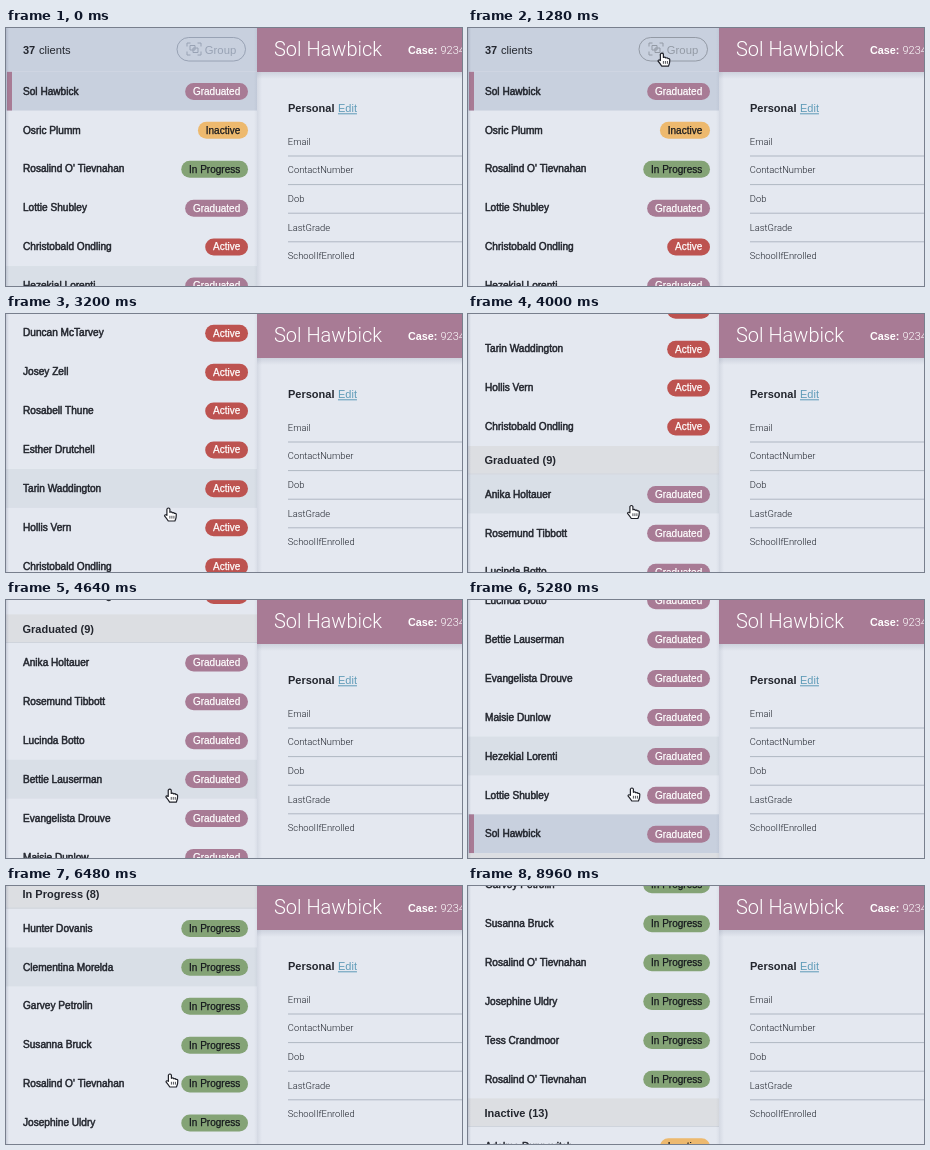
An HTML page with a canvas for the animation above (9840 ms loop, 456 by 258 pixels).

```html
<!DOCTYPE html>
<html lang="en">
<head>
<meta charset="utf-8">
<title>Client list</title>
<style>
  html, body { margin: 0; width: 100%; height: 100%; overflow: hidden; background: #e4e8f0; }
  canvas { display: block; width: 456px; height: 258px; }
</style>
</head>
<body>
<canvas id="stage"></canvas>
<script>
const W = 456, H = 258, LOOP = 9840;
const TOP = 43.6, ROW = 38.9, HEAD = 28.6, LIST = 251;
const GROUPED_AT = 1760, GONE_AT = 8400;
const SANS = '"Liberation Sans", Arial, sans-serif';
const LIGHT = 'Roboto, "Liberation Sans", sans-serif';
const INK = '#23262e', MAUVE = '#a87b95', PALE = '#e4e8f0', PICKED = '#c8d0de', LINK = '#5f9bb8';

const STATUS = {
  Active: { fill: '#bd5350', ink: '#fff' },
  Graduated: { fill: MAUVE, ink: '#fff' },
  'In Progress': { fill: '#84a376', ink: '#14171c' },
  Inactive: { fill: '#edb96e', ink: '#14171c' }
};
const SELECTED = 'Sol Hawbick';

const groups = [
  ['Active', 7, ['Duncan McTarvey', 'Josey Zell', 'Rosabell Thune', 'Esther Drutchell',
    'Tarin Waddington', 'Hollis Vern', 'Christobald Ondling']],
  ['Graduated', 9, ['Anika Holtauer', 'Rosemund Tibbott', 'Lucinda Botto', 'Bettie Lauserman',
    'Evangelista Drouve', 'Maisie Dunlow', 'Hezekial Lorenti', 'Lottie Shubley', SELECTED]],
  ['In Progress', 8, ['Hunter Dovanis', 'Clementina Morelda', 'Garvey Petrolin', 'Susanna Bruck',
    "Rosalind O' Tievnahan", 'Josephine Uldry', 'Tess Crandmoor', "Rosalind O' Tievnahan"]],
  ['Inactive', 13, ['Adelmo Dunnevitch']]
];
const mixed = [
  [SELECTED, 'Graduated'], ['Osric Plumm', 'Inactive'], ["Rosalind O' Tievnahan", 'In Progress'],
  ['Lottie Shubley', 'Graduated'], ['Christobald Ondling', 'Active'], ['Hezekial Lorenti', 'Graduated']
];

// Items carry their top edge in list coordinates.
const flatList = mixed.map(([name, status], i) => ({ name, status, y: TOP + i * ROW, h: ROW }));
const groupedList = [];
let nextY = TOP;
for (const [status, count, names] of groups) {
  groupedList.push({ title: `${status} (${count})`, y: nextY, h: HEAD });
  nextY += HEAD;
  for (const name of names) {
    groupedList.push({ name, status, y: nextY, h: ROW });
    nextY += ROW;
  }
}

// [time, scroll offset]
const scrollKeys = [[2960, 0], [3200, 72.5], [3520, 184], [3600, 184], [4000, 212.4], [4400, 300],
  [4480, 300], [5040, 450], [5200, 450], [5280, 469.7], [5920, 625], [6160, 625], [6480, 728.8], [6720, 850.6]];
// [time, x, y] of the fingertip
const pointerKeys = [[0, 178, 264], [240, 180, 250], [360, 180, 250], [1200, 194, 25], [2400, 194, 25],
  [2880, 162.5, 193.8], [3200, 162.5, 193.8], [4000, 163.5, 191.3], [5040, 164, 187.8], [7680, 164, 187.8],
  [8000, 168, 226], [8080, 168, 226], [8400, 176, 264]];
// While scrolling, the hovered row only refreshes at these times.
const hoverTimes = [2960, 3120, 3560, 4440, 5120, 6000, 6720];

function segment(keys, t) {
  let i = 0;
  while (i < keys.length - 2 && t >= keys[i + 1][0]) i++;
  return i;
}

function slope(keys, i) {
  const rate = j => (keys[j + 1][1] - keys[j][1]) / (keys[j + 1][0] - keys[j][0]);
  if (i === 0 || i === keys.length - 1) return 0;
  const a = rate(i - 1), b = rate(i);
  return a * b > 0 ? 2 * a * b / (a + b) : 0;
}

const unit = (t, a, b) => Math.min(1, Math.max(0, (t - a) / (b - a)));

function scrollAt(t) {
  const i = segment(scrollKeys, t);
  const [t0, a] = scrollKeys[i], [t1, b] = scrollKeys[i + 1];
  const u = unit(t, t0, t1), d = t1 - t0;
  return a + (b - a) * u * u * (3 - 2 * u)
    + d * slope(scrollKeys, i) * u * (1 - u) * (1 - u)
    - d * slope(scrollKeys, i + 1) * u * u * (1 - u);
}

function pointerAt(t) {
  const i = segment(pointerKeys, t);
  const [t0, x0, y0] = pointerKeys[i], [t1, x1, y1] = pointerKeys[i + 1];
  const u = unit(t, t0, t1), e = u * u * (3 - 2 * u);
  return { x: x0 + (x1 - x0) * e, y: y0 + (y1 - y0) * e };
}

function hoverAt(t) {
  if (t >= GONE_AT) return -1;
  let when = t;
  if (t >= hoverTimes[0] && t < 7680) when = hoverTimes.filter(h => h <= t).pop();
  return scrollAt(when) + pointerAt(when).y;
}

const canvas = document.getElementById('stage');
const ratio = window.devicePixelRatio || 1;
canvas.width = Math.round(W * ratio);
canvas.height = Math.round(H * ratio);
const ctx = canvas.getContext('2d');
ctx.scale(ratio, ratio);
ctx.lineJoin = 'round';

function box(x, y, w, h, fill) {
  ctx.fillStyle = fill;
  ctx.fillRect(x, y, w, h);
}

// A thin outline of the given weight stands in for a medium face.
function text(str, x, y, font, fill = INK, weight = 0) {
  ctx.font = font;
  ctx.fillStyle = ctx.strokeStyle = fill;
  ctx.fillText(str, x, y);
  if (weight) {
    ctx.lineWidth = weight;
    ctx.strokeText(str, x, y);
  }
  return ctx.measureText(str).width;
}

function roundPath(x, y, w, h, r) {
  ctx.beginPath();
  ctx.moveTo(x + r, y);
  ctx.arcTo(x + w, y, x + w, y + h, r);
  ctx.arcTo(x + w, y + h, x, y + h, r);
  ctx.arcTo(x, y + h, x, y, r);
  ctx.arcTo(x, y, x + w, y, r);
  ctx.closePath();
}

function shade(x0, y0, x1, y1, from, to) {
  const g = ctx.createLinearGradient(x0, y0, x1, y1);
  g.addColorStop(0, `rgba(70,80,110,${from})`);
  g.addColorStop(1, `rgba(70,80,110,${to})`);
  return g;
}

function drawPill(status, mid) {
  const { fill, ink } = STATUS[status], font = `10px ${SANS}`;
  ctx.font = font;
  const w = ctx.measureText(status).width + 15.6;
  roundPath(242 - w, mid - 8.5, w, 17, 8.5);
  ctx.fillStyle = fill;
  ctx.fill();
  text(status, 249.8 - w, mid + 3.4, font, ink, 0.25);
}

function drawItem(item, y, hovered) {
  const mid = y + item.h / 2;
  if (item.title) {
    box(0, y, LIST, item.h, '#dcdee2');
    box(0, y + item.h - 1, LIST, 1, '#cfd4dc');
    text(item.title, 16.5, mid + 4, `bold 11px ${SANS}`);
    return;
  }
  const selected = item.name === SELECTED;
  if (selected || hovered) box(0, y, LIST, item.h, selected ? PICKED : '#d9dfe7');
  if (selected) box(1, y, 5, item.h, MAUVE);
  text(item.name, 17, mid + 3.6, `10.1px ${SANS}`, INK, 0.5);
  drawPill(item.status, mid + 0.4);
}

function drawGroupIcon(x, y) {
  for (const [cx, cy, sx, sy] of [[0, 0, 1, 1], [14, 0, -1, 1], [0, 12, 1, -1], [14, 12, -1, -1]]) {
    ctx.beginPath();
    ctx.moveTo(x + cx, y + cy + 3.5 * sy);
    ctx.lineTo(x + cx, y + cy);
    ctx.lineTo(x + cx + 3.5 * sx, y + cy);
    ctx.stroke();
  }
  ctx.strokeRect(x + 3, y + 2.5, 5, 4.5);
  ctx.strokeRect(x + 6, y + 5, 5, 4.5);
}

function drawToolbar(y, active) {
  const tone = active ? '#939aa5' : '#98a2b4';
  box(0, y, LIST, TOP, PICKED);
  text('37', 17, y + 25.5, `bold 11px ${SANS}`);
  text('clients', 33, y + 25.5, `11.2px ${SANS}`);
  ctx.strokeStyle = tone;
  ctx.lineWidth = 1;
  roundPath(171, y + 9.5, 68.5, 23.5, 11.75);
  ctx.stroke();
  drawGroupIcon(181, y + 15);
  text('Group', 198.8, y + 25.5, `11.3px ${SANS}`, tone);
}

function drawDetails() {
  box(LIST, 0, W - LIST, H, PALE);
  box(LIST, 44, 5, H - 44, shade(LIST, 0, LIST + 5, 0, 0.1, 0));
  box(LIST, 44, W - LIST, 7, shade(0, 44, 0, 51, 0.14, 0));
  box(LIST, 0, W - LIST, 44, MAUVE);
  text(SELECTED, 268, 27.5, `300 20px ${LIGHT}`, '#fff');
  text('Case:', 402, 25.5, `bold 10.8px ${SANS}`, '#fff');
  text('92345', 434.5, 25.5, `300 11px ${LIGHT}`, '#fff');

  text('Personal', 282, 84, `bold 11px ${SANS}`);
  const w = text('Edit', 332, 84, `11px ${SANS}`, LINK);
  box(332, 85.3, w, 1, LINK);
  ['Email', 'ContactNumber', 'Dob', 'LastGrade', 'SchoolIfEnrolled'].forEach((label, i) => {
    const y = 116.8 + i * 28.6;
    text(label, 281.8, y, `300 9.4px ${LIGHT}`, '#1c2029');
    if (i < 4) box(282, y + 10.7, W - 282, 1, '#b0b7c3');
  });
}

const hand = new Path2D('M-1.6 7.5V1.2Q0-.8 1.4 1.2V4.5Q3 3.6 3.8 5Q5.4 4.3 6 5.6Q7.6 5.2 7.8 6.8' +
  'L7.6 9.5Q7.4 11 6.4 13.2H-.2Q-1.5 11-4 8Q-3.6 6.2-1.6 7.5Z');
const knuckles = new Path2D('M1.4 8V10.8M3.4 8V10.8M5.4 8V10.8');

function drawPointer({ x, y }) {
  ctx.save();
  ctx.translate(x, y);
  ctx.fillStyle = '#fff';
  ctx.strokeStyle = '#20222a';
  ctx.lineWidth = 1.2;
  ctx.fill(hand);
  ctx.stroke(hand);
  ctx.lineWidth = 0.8;
  ctx.stroke(knuckles);
  ctx.restore();
}

function draw(t) {
  const offset = scrollAt(t), hoverY = hoverAt(t);
  box(0, 0, W, H, PALE);
  ctx.save();
  ctx.beginPath();
  ctx.rect(0, 0, LIST, H);
  ctx.clip();
  for (const item of t < GROUPED_AT ? flatList : groupedList) {
    const y = item.y - offset;
    if (y > H || y + item.h < 0) continue;
    drawItem(item, y, hoverY >= item.y && hoverY < item.y + item.h);
  }
  if (offset < TOP) drawToolbar(-offset, hoverY > 9 && hoverY < 33);
  box(0, 0, 3, H, shade(0, 0, 3, 0, 0.18, 0));
  box(LIST - 3, 0, 3, H, shade(LIST - 3, 0, LIST, 0, 0, 0.06));
  ctx.restore();
  drawDetails();
  if (t < GONE_AT) drawPointer(pointerAt(t));
}

const start = performance.now();
function tick() {
  draw((performance.now() - start) % LOOP);
  requestAnimationFrame(tick);
}
tick();
</script>
</body>
</html>
```
